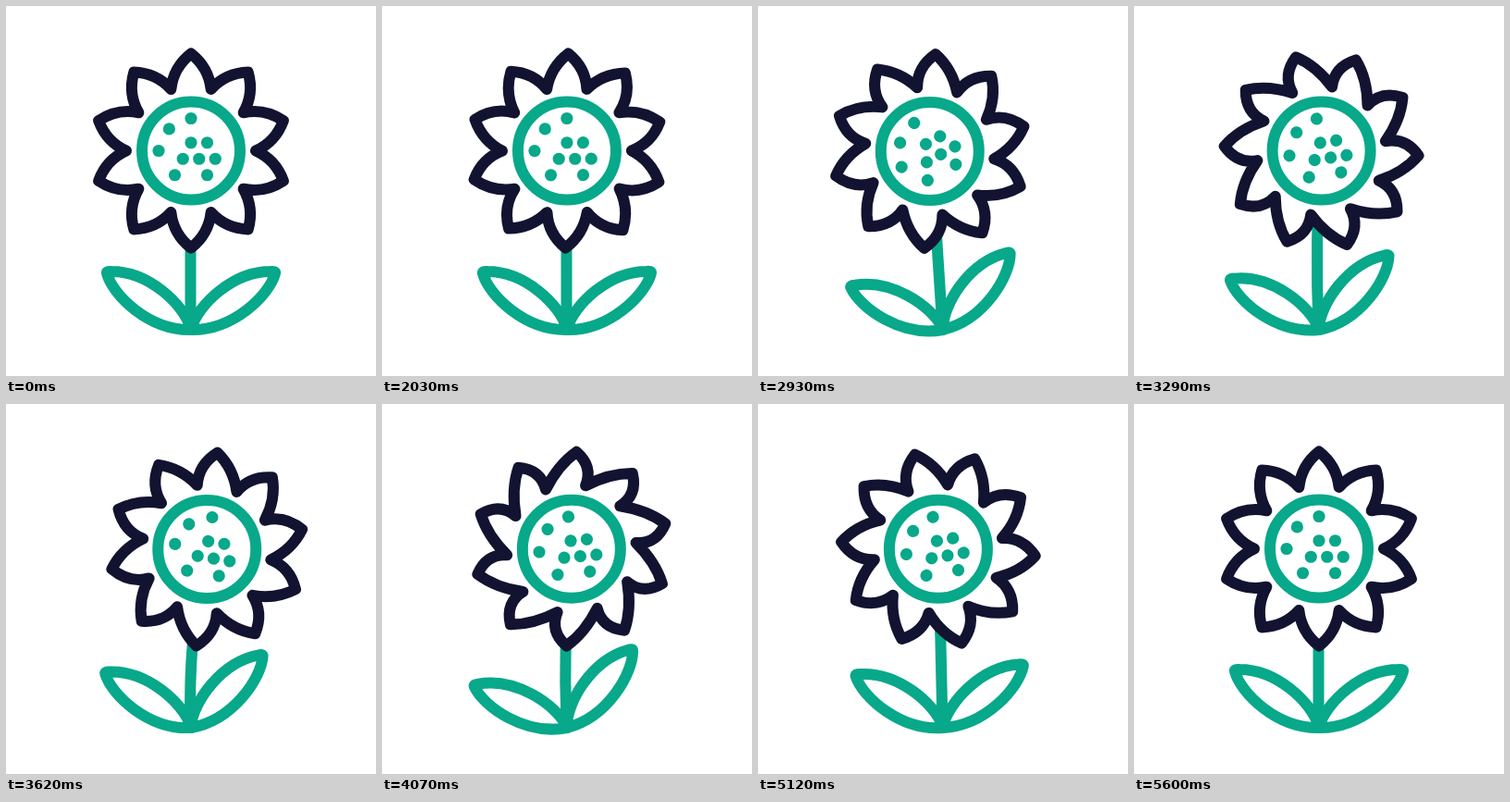
Write an HTML page that moves like this. It is 400 px wide and 400 px high and loops after 5.63 s.

```html
<!DOCTYPE html>
<html lang="en">
<head>
<meta charset="utf-8">
<title>Swaying sunflower</title>
<style>
  html, body { margin: 0; width: 100%; height: 100%; overflow: hidden; background: #fff; }
  svg { display: block; width: 100vw; height: 100vh; }
  .line { fill: none; stroke: #08a88a; stroke-width: 12; stroke-linejoin: round; stroke-linecap: round; }
  #petals { fill: #fff; stroke: #121331; }
  #dots { fill: #08a88a; }
</style>
</head>
<body>
<svg viewBox="0 0 400 400">
  <path id="stem" class="line"/>
  <path id="left" class="line"/>
  <path id="right" class="line"/>
  <g id="head">
    <path id="petals" class="line"/>
    <circle class="line" r="53"/>
    <g id="dots"></g>
  </g>
</svg>
<script>
const LOOP = 5630, START = 2000, STEP = 30;
const BEATS = [0, 780, 1750, 2490, 3490];
const LEAF_PACE = 1.03, LAG = 100;
const $ = id => document.getElementById(id);
const set = (id, name, value) => $(id).setAttribute(name, value);

// Eases from rest through three poses, one per beat, and back to rest
function swing(...poses) {
  const keys = [0, ...poses, 0];
  return t => {
    const i = BEATS.findIndex(beat => t < beat);
    if (i < 1) return 0;
    const u = (t - BEATS[i - 1]) / (BEATS[i] - BEATS[i - 1]);
    return keys[i - 1] + (keys[i] - keys[i - 1]) * u * u * (3 - 2 * u);
  };
}

const sway = swing(-16.5, 19, -16.5);
const bend = swing(-5.5, -3, -5.5);
const spin = swing(-32, 11.5, -31);
const leftTurn = swing(-10, -1.5, -17.5);
const rightTurn = swing(-15, -11, -20);

function polar(r, deg) {
  const a = deg * Math.PI / 180;
  return (r * Math.sin(a)).toFixed(2) + ' ' + (-r * Math.cos(a)).toFixed(2) + ' ';
}

// The tips lean away from the valleys by the given angle
function petalPath(lean) {
  let d = 'M' + polar(70, -18);
  for (let a = 0; a < 360; a += 36) {
    const tip = a + lean;
    d += 'Q' + polar(92, tip - 12) + polar(105, tip) +
      'Q' + polar(92, tip + 12) + polar(70, a + 18);
  }
  return d + 'Z';
}

function leafPath(side) {
  const p = (x, y) => `${200 + side * x} ${y} `;
  return 'M' + p(0, 349) + 'C' + p(8, 322) + p(46, 287) + p(86, 287) +
    'Q' + p(92, 286.5) + p(91, 289) + 'C' + p(85, 312) + p(46, 351) + p(0, 350) + 'Z';
}

set('left', 'd', leafPath(-1));
set('right', 'd', leafPath(1));

// Seeds sit on a loose grid
const seeds = [[0, -4], [-2.7, -2.7], [-4, 0], [0, -1], [2, -1], [-1, 1], [1, 1], [3, 1], [-2, 3], [2, 3]];
$('dots').innerHTML = seeds
  .map(([x, y]) => `<circle cx="${x * 8.75}" cy="${y * 8.75}" r="6.6"/>`).join('');

function draw(time) {
  const t = Math.max(0, Math.floor((time % LOOP - START) / STEP) * STEP);
  const x = 200 + sway(t), y = 156.5 + Math.abs(sway(t)) / 32;
  // The tips trail the turning head; at rest nothing moves
  const lean = t ? spin(t - LAG / 2) - spin(t + LAG / 2) : 0;

  set('stem', 'd', `M199.5 349Q${199.5 + bend(t)} 253 ${x - 0.5} ${y}`);
  set('head', 'transform', `translate(${x} ${y})`);
  set('petals', 'd', petalPath(lean));
  set('petals', 'transform', `rotate(${spin(t)})`);
  set('dots', 'transform', `rotate(${spin(t)})`);
  set('left', 'transform', `rotate(${leftTurn(t * LEAF_PACE)} 200 350)`);
  set('right', 'transform', `rotate(${rightTurn(t * LEAF_PACE)} 200 350)`);
}

const begin = performance.now();
function tick() {
  draw(performance.now() - begin);
  requestAnimationFrame(tick);
}
tick();
</script>
</body>
</html>
```
